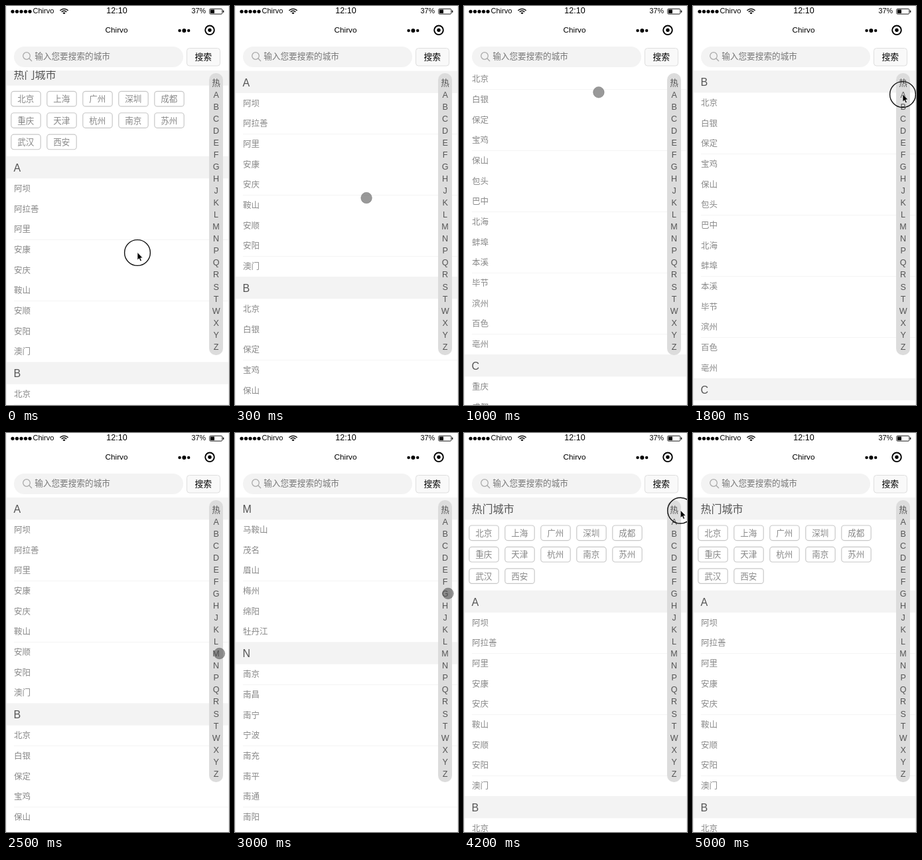
Animation of 336 by 600 pixels, one loop 5.1 s. Source, as an HTML page with a canvas:

```html
<!DOCTYPE html>
<html lang="zh">
<head>
<meta charset="utf-8">
<title>城市选择</title>
<style>
html, body { margin: 0; width: 100%; height: 100%; overflow: hidden; background: #fff; }
canvas { display: block; }
</style>
</head>
<body>
<canvas id="stage" width="336" height="600"></canvas>
<script>
const ctx = document.getElementById('stage').getContext('2d');
const W = 336, H = 600, LOOP = 5100, STEP = 100;
const LIST_TOP = 97, HEAD = 100 / 3, ROW = 92 / 3, HOT_HEIGHT = 419 / 3;
const FONT = '"Liberation Sans", "Noto Sans CJK SC", "Noto Sans CJK", sans-serif';
const APP = 'Chirvo';

const hot = '北京 上海 广州 深圳 成都 重庆 天津 杭州 南京 苏州 武汉 西安'.split(' ');
const index = [...'热ABCDEFGHJKLMNPQRSTWXYZ'];
const indexY = letter => 115 + index.indexOf(letter) * 18.05;
const cities = {
  A: '阿坝 阿拉善 阿里 安康 安庆 鞍山 安顺 安阳 澳门',
  B: '北京 白银 保定 宝鸡 保山 包头 巴中 北海 蚌埠 本溪 毕节 滨州 百色 亳州',
  C: '重庆 成都 长春 长沙 常德 昌都 长治 常州 巢湖 承德 郴州 赤峰 潮州 崇左',
  D: '大连 东莞 大理 丹东 大庆 大同 大兴安岭 德宏 德阳 德州 定西 迪庆 东营 达州',
  E: '鄂尔多斯 恩施 鄂州',
  F: '福州 防城港 佛山 抚顺 抚州 阜新 阜阳',
  G: '广州 赣州 桂林 贵阳 甘南 甘孜 广安 广元 果洛 贵港',
  H: '杭州 哈尔滨 合肥 海口 呼和浩特 海北 海东 海南 海西 邯郸 汉中 鹤壁',
  M: '马鞍山 茂名 眉山 梅州 绵阳 牡丹江',
  N: '南京 南昌 南宁 宁波 南充 南平 南通 南阳 那曲 内江 宁德 怒江'
};

const offsets = { 热: 0 };
let nextTop = HOT_HEIGHT;
const sections = Object.entries(cities).map(([letter, names]) => {
  const section = { letter, names: names.split(' '), top: nextTop };
  offsets[letter] = nextTop;
  nextTop += HEAD + section.names.length * ROW;
  return section;
});

const clamp = v => Math.max(0, Math.min(1, v));
const mix = (a, b, u) => a + (b - a) * u;
const easeOut = (u, power) => 1 - (1 - u) ** power;

// One swipe over the list, then taps on the index bar.
const swipe = { start: 100, end: 1200 };
const swipeProgress = t => clamp((t - swipe.start) / (swipe.end - swipe.start));
const swipePoint = u => ({ x: 198 + 9 * u ** 3, y: 371 - 249.5 * easeOut(u, 2) });
const tap = (letter, time, x) => ({ letter, time, x, y: indexY(letter) });
const taps = [
  tap('B', 1500, 316), tap('A', 1900, 316), tap('M', 2500, 321.5),
  tap('G', 3000, 321), tap('D', 3400, 320), tap('热', 4000, 319)
];
const stops = [
  { time: swipe.end - STEP, ...swipePoint(1) },
  ...taps,
  { time: 4800, x: 362, y: 125 }
];

function scrollAt(t) {
  const last = taps.filter(({ time }) => t > time).pop();
  if (last) return offsets[last.letter];
  const scroll = 10.67 + 521 * easeOut(swipeProgress(t), 1.41);
  return Math.round(scroll * 3) / 3;
}

function pointerAt(t) {
  if (t < swipe.end) return { ...swipePoint(swipeProgress(t)), pressed: t >= swipe.start };
  const next = stops.findIndex(({ time }) => time > t);
  if (next < 0) return { ...stops[stops.length - 1], pressed: false };
  const from = stops[next - 1], to = stops[next];
  const u = clamp((t - from.time - STEP) / (to.time - from.time - 2 * STEP));
  return {
    x: mix(from.x, to.x, u),
    y: mix(from.y, to.y, u),
    pressed: t < from.time + STEP
  };
}

function text(str, x, y, size, color, align = 'left') {
  ctx.font = `${size}px ${FONT}`;
  ctx.fillStyle = color;
  ctx.textAlign = align;
  ctx.fillText(str, x, y + size * 0.37);
}

function rect(x, y, w, h, color) {
  ctx.fillStyle = color;
  ctx.fillRect(x, y, w, h);
}

function paint(fill, stroke, width) {
  if (fill) { ctx.fillStyle = fill; ctx.fill(); }
  if (stroke) { ctx.strokeStyle = stroke; ctx.lineWidth = width; ctx.stroke(); }
}

function box(x, y, w, h, r, fill, stroke, width = 1) {
  ctx.beginPath();
  ctx.roundRect(x, y, w, h, r);
  paint(fill, stroke, width);
}

function circle(x, y, r, fill, stroke, width = 1) {
  ctx.beginPath();
  ctx.arc(x, y, r, 0, Math.PI * 2);
  paint(fill, stroke, width);
}

function heading(label, y) {
  rect(0, y, W, HEAD, '#f3f3f3');
  text(label, 11.5, y + 17, 16, '#555');
}

function drawList(scroll) {
  ctx.save();
  ctx.beginPath();
  ctx.rect(0, LIST_TOP, W, H - LIST_TOP);
  ctx.clip();
  const origin = LIST_TOP - scroll;
  heading('热门城市', origin);
  hot.forEach((name, i) => {
    const x = 7.8 + i % 5 * 54, y = origin + 42 + Math.floor(i / 5) * 32.4;
    box(x, y, 44.4, 22.6, 4, '#fff', '#c8c8c8', 1.2);
    text(name, x + 22, y + 11.2, 12.6, '#888', 'center');
  });
  for (const { letter, names, top } of sections) {
    const y = origin + top;
    heading(letter, y);
    names.forEach((name, i) => {
      const rowTop = y + HEAD + i * ROW, bottom = rowTop + ROW;
      if (rowTop > H || bottom < LIST_TOP) return;
      text(name, 12, rowTop + ROW / 2 - 0.3, 12.5, '#888');
      // Hairlines only survive on every third row of the pixel grid.
      const onGrid = Math.abs(bottom % 1 - 1 / 3) < 0.15;
      if (onGrid && i < names.length - 1) rect(12, Math.floor(bottom), W - 12, 1, '#f4f4f4');
    });
  }
  ctx.restore();
}

function drawStatus() {
  for (let i = 0; i < 5; i++) circle(10 + i * 6.5, 8.3, 2.6, '#000');
  text(APP, 40.5, 7, 11, '#000');
  ctx.save();
  ctx.beginPath();
  ctx.moveTo(87.5, 12.2);
  ctx.arc(87.5, 12.2, 9, -Math.PI * 0.77, -Math.PI * 0.23);
  ctx.clip();
  circle(87.5, 12.2, 2.6, '#000');
  circle(87.5, 12.2, 5, null, '#000', 1.5);
  circle(87.5, 12.2, 8, null, '#000', 1.5);
  ctx.restore();
  text('12:10', 167, 6.6, 12.5, '#000', 'center');
  text('37%', 301, 7.2, 10.8, '#000', 'right');
  box(306.8, 4.3, 19, 7.8, 1.5, '#fff', '#000', 0.9);
  rect(308, 5.5, 6, 5.4, '#000');
  rect(326.8, 6.7, 1.5, 3, '#000');
}

function drawTop() {
  drawStatus();
  text(APP, 166.5, 36, 11.8, '#000', 'center');
  for (const side of [-1, 0, 1]) circle(268.4 + side * 6.8, 37, side ? 2.2 : 3, '#000');
  circle(307, 36.3, 6.8, null, '#000', 1.9);
  circle(307, 36.3, 2.7, '#000');

  box(12, 61, 255, 31, 15.5, '#f3f3f3');
  circle(31, 75, 5.3, null, '#aaa', 1.3);
  ctx.beginPath();
  ctx.moveTo(34.8, 78.8);
  ctx.lineTo(39, 83);
  paint(null, '#aaa', 1.4);
  text('输入您要搜索的城市', 43.2, 75.6, 12.65, '#777');
  box(272.5, 63.5, 50, 26.5, 4, '#f9f9f9', '#dedede');
  text('搜索', 297.2, 76.5, 12.8, '#000', 'center');
}

function drawIndex() {
  box(306, 101, 21, 424, 10, '#dcdcdc');
  index.forEach(letter => text(letter, 316.6, indexY(letter), 12.6, '#555', 'center'));
}

function drawPointer({ x, y, pressed }) {
  if (pressed) {
    circle(x, y, 8.3, 'rgba(70,70,70,.55)', 'rgba(70,70,70,.35)', 0.9);
    return;
  }
  circle(x, y, 19.4, null, '#111', 1.4);
  ctx.save();
  ctx.translate(x, y - 0.5);
  ctx.beginPath();
  [[0, 0], [0, 11.5], [2.6, 9.2], [4.4, 13.3], [6.4, 12.4], [4.6, 8.5], [8, 8.2]]
    .forEach(point => ctx.lineTo(...point));
  ctx.closePath();
  paint('#000', '#fff', 0.7);
  ctx.restore();
}

function draw(t) {
  rect(0, 0, W, H, '#fff');
  drawList(scrollAt(t));
  drawTop();
  drawIndex();
  rect(0, 0, 1, H, '#ececec');
  rect(W - 1, 0, 1, H, '#ececec');
  drawPointer(pointerAt(t));
}

const start = performance.now();
function tick() {
  const elapsed = (performance.now() - start) % LOOP;
  draw(Math.floor(elapsed / STEP) * STEP);
  requestAnimationFrame(tick);
}
tick();
</script>
</body>
</html>
```
